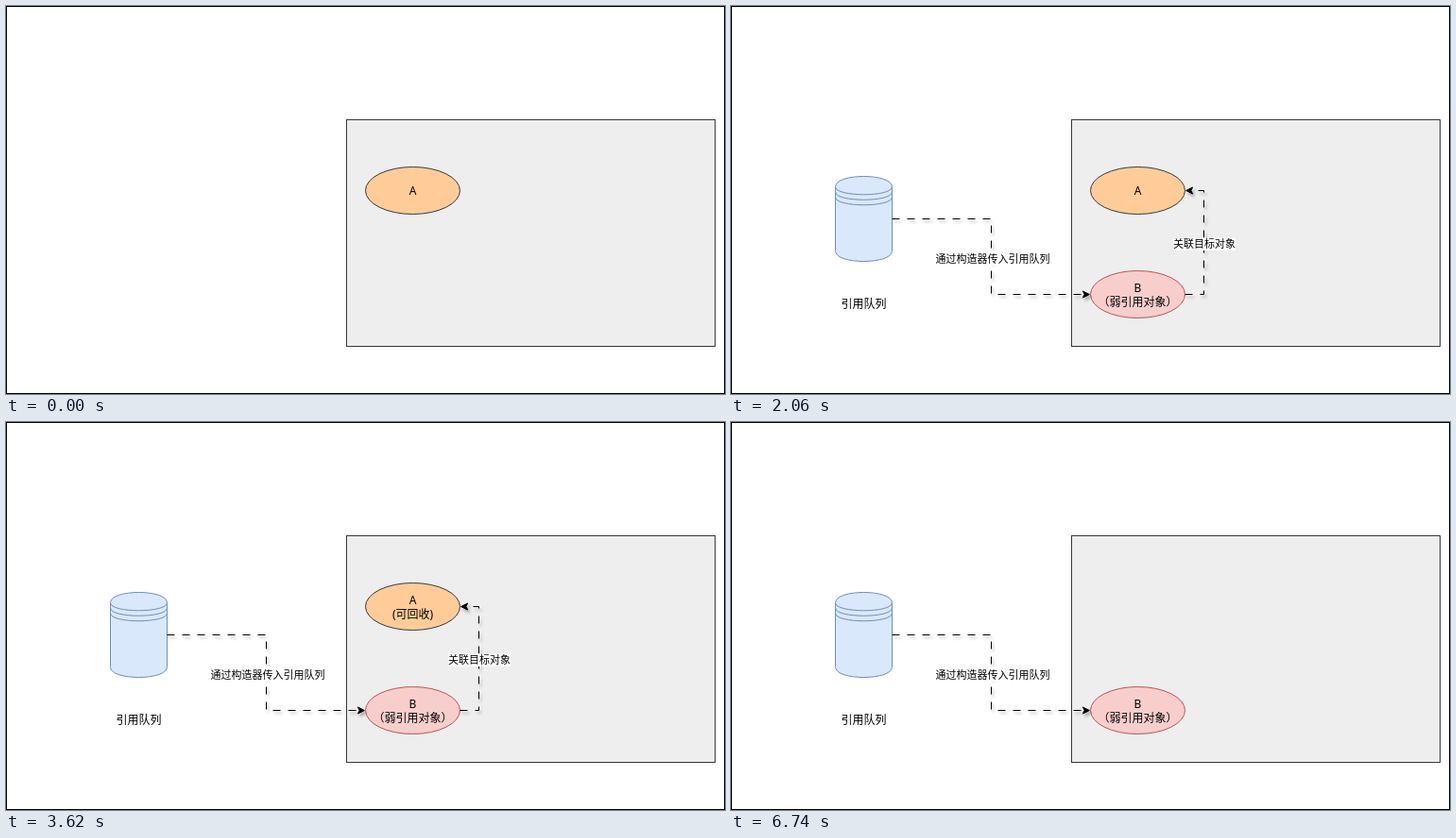
An HTML page that plays this animation: 761 px wide and 411 px high, repeating every 8 s.

```html
<!DOCTYPE html>
<html lang="zh-CN">
<head>
<meta charset="utf-8">
<title>弱引用与引用队列</title>
<style>
  html, body { margin: 0; width: 100%; height: 100%; overflow: hidden; background: #fff; }
  svg { display: block; }
  text { font: 12px "Noto Sans", "Noto Sans CJK SC", "Noto Sans CJK", sans-serif; text-anchor: middle; }
  .label { font-size: 11px; }
  .alert { font: bold 12px "Liberation Sans", "Noto Sans CJK SC", "Noto Sans CJK", sans-serif; fill: #fff; }
  .queue { fill: #dae8fc; stroke: #6c8ebf; }
  .line { fill: none; stroke: #000; stroke-dasharray: 8 8; }
  .head { stroke: #000; }
  .edge { filter: drop-shadow(2px 3px 1.7px rgba(0, 0, 0, .3)); }
</style>
</head>
<body>
<svg width="761" height="411" viewBox="0 0 761 411">
  <rect x=".5" y=".5" width="760" height="410" fill="#fff" stroke="#000"/>
  <rect x="360.5" y="120.5" width="390" height="240" fill="#eee" stroke="#36393d"/>

  <g data-from="500">
    <g class="queue" transform="translate(110.5 180.5)">
      <path d="M0 11C0 -3.67 60 -3.67 60 11V79C60 93.67 0 93.67 0 79Z"/>
      <path fill="none" d="M0 11C0 22 60 22 60 11M0 16.5C0 27.5 60 27.5 60 16.5M0 22C0 33 60 33 60 22"/>
    </g>
    <text x="140.5" y="320">引用队列</text>
  </g>

  <g data-to="6740">
    <ellipse cx="430.5" cy="195.5" rx="50" ry="25" fill="#fc9" stroke="#36393d"/>
    <text x="430.5" y="200" data-to="3620">A</text>
    <g data-from="3620">
      <text x="430.5" y="193">A</text>
      <text x="430.5" y="208">(可回收)</text>
    </g>
  </g>

  <g data-from="2060">
    <ellipse cx="430.5" cy="305.5" rx="50" ry="25" fill="#f8cecc" stroke="#b85450"/>
    <text x="430.5" y="303">B</text>
    <text x="430.5" y="318">（弱引用对象）</text>
    <g class="edge">
      <path class="line" d="M170.5 225.5H275.5V305.5H374"/>
      <path class="head" d="M379.4 305.5L372.4 309L374.1 305.5L372.4 302Z"/>
    </g>
    <rect x="216.5" y="261.5" width="122" height="13" fill="#fff"/>
    <text class="label" x="277" y="272">通过构造器传入引用队列</text>
  </g>

  <g data-from="2060" data-to="6740">
    <g class="edge">
      <path class="line" d="M480.5 305.5H500.5V195.5H487"/>
      <path class="head" d="M481.6 195.5L488.6 192L486.9 195.5L488.6 199Z"/>
    </g>
    <rect x="468" y="245.5" width="66" height="13.5" fill="#fff"/>
    <text class="label" x="501" y="256">关联目标对象</text>
  </g>

  <g data-from="5180" data-to="6740">
    <path d="M440.5 130.5H550.5V175.5H480L455.5 190.5L462.5 175.5H440.5Z" fill="#e51400" stroke="#b20000"/>
    <text class="alert" x="495.5" y="158">GC 会回收目标对象</text>
  </g>
</svg>
<script>
  const LOOP = 8000;
  const parts = [...document.querySelectorAll("[data-from], [data-to]")].map(node => ({
    node,
    from: Number(node.dataset.from ?? 0),
    to: Number(node.dataset.to ?? LOOP)
  }));

  function render(time) {
    for (const { node, from, to } of parts) {
      node.style.display = time >= from && time < to ? "" : "none";
    }
  }

  const start = performance.now();
  function tick() {
    render((performance.now() - start) % LOOP);
    requestAnimationFrame(tick);
  }
  tick();
</script>
</body>
</html>
```
